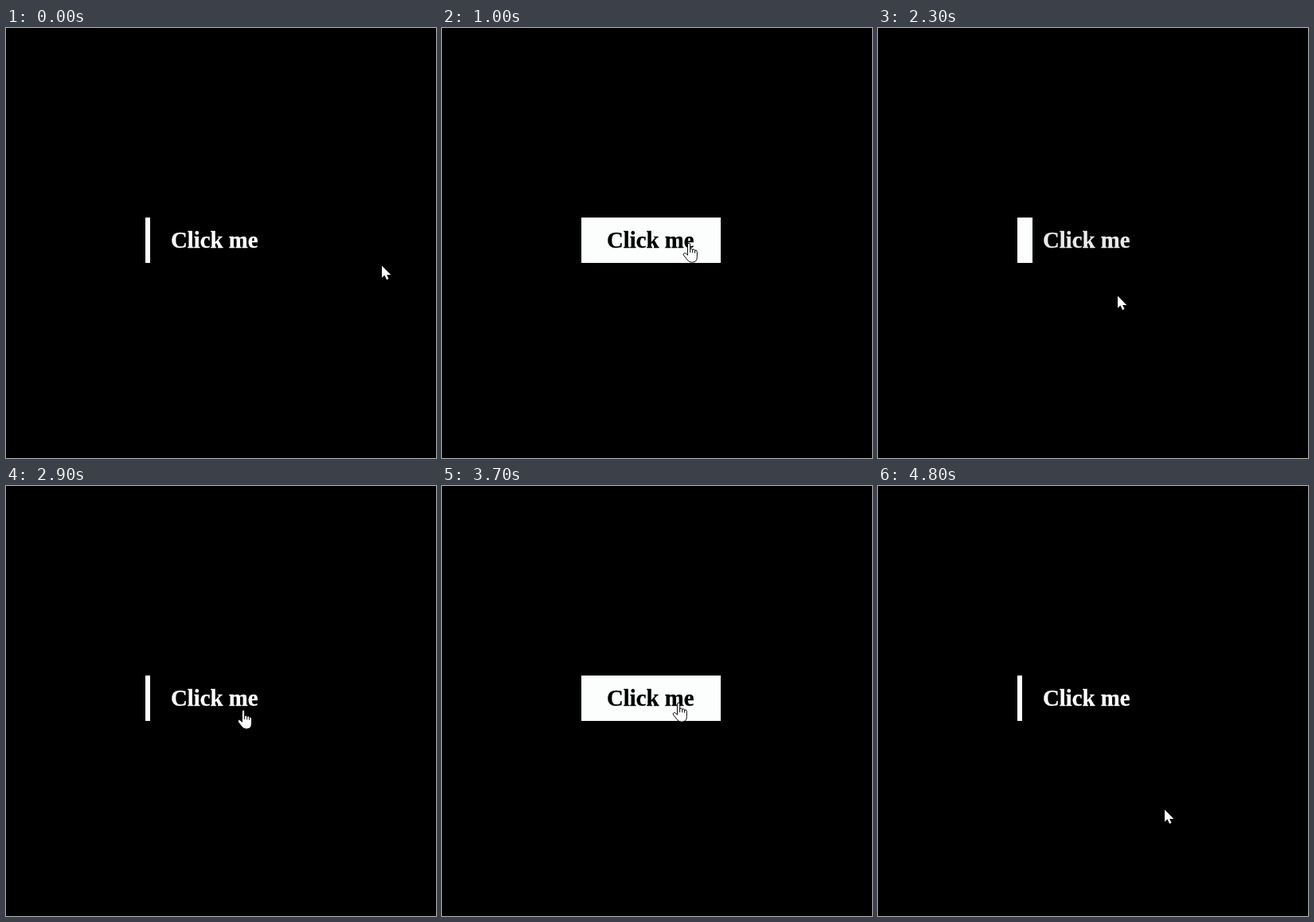
An HTML page that plays this animation: 540 px wide and 540 px high, repeating every 5 s.

```html
<!DOCTYPE html>
<html lang="en">
<head>
<meta charset="utf-8">
<title>Click me</title>
<style>
  html, body { margin: 0; width: 100%; height: 100%; overflow: hidden; background: #000; }
  svg { display: block; width: 540px; height: 540px; }
  text { font: bold 28.8px "Liberation Serif", "Times New Roman", serif; stroke-width: .3px; }
  #arrow, #hand { fill: #fff; stroke: #000; stroke-linejoin: round; stroke-linecap: round; }
</style>
</head>
<body>
<svg viewBox="0 0 540 540">
  <rect id="fill" x="175" y="238" width="6" height="57" fill="#fcfefd"/>
  <text id="label" x="207" y="276">Click me</text>
  <g id="cursor">
    <path id="arrow" paint-order="stroke"
      d="M0-.5V14.6L3.5 11.5L6 17L8.5 16L6.2 11H11.3Z"/>
    <g id="hand" transform="translate(-6.5 -1.2) scale(1.08)" stroke-width=".9">
      <path d="M5.5 14V2a1.5 1.5 0 0 1 3 0V7.2q1.4-1.3 2.8.6q1.5-.9 2.7.8q2.5-.6 2.5 2V16.5q0 6-5.5 6H10q-3 0-5-3L.8 14.2q-.6-1.6.7-2.2q1.4-.5 2.4.6Z"/>
      <path fill="none" d="M8.5 7V11M11.3 8V11.3M14 9V11.6"/>
    </g>
  </g>
</svg>
<script>
const LOOP = 5000, STEP = 100, FADE = 430;
const BOX = { left: 175, right: 350, top: 238, bottom: 295, bar: 6 };
const START = { x: 472, y: 299 };

// Each glide eases the pointer from wherever it rests to a new spot.
const glides = [
  { from: 200, to: 600, x: 325, y: 264 },
  { from: 600, to: 800, x: 309, y: 271 },
  { from: 1100, to: 1600, x: 296, y: 268 },
  { from: 1800, to: 2300, x: 301, y: 337 },
  { from: 2700, to: 2960, x: 296, y: 273 },
  { from: 3700, to: 3920, x: 360, y: 407 }
];
// Moments when the pointer enters, leaves, enters, leaves.
const crossings = [473, 2015, 2900, 3790];

const el = id => document.getElementById(id);
const mix = (a, b, k) => a + (b - a) * k;
const clamp = k => Math.min(1, Math.max(0, k));
const smooth = k => k * k * (3 - 2 * k);

// The CSS "ease" curve, cubic-bezier(.25, .1, .25, 1)
function ease(x) {
  let lo = 0, hi = 1, u;
  for (let i = 0; i < 30; i++) {
    u = (lo + hi) / 2;
    if (.75 * u * (1 - u) + u ** 3 < x) lo = u; else hi = u;
  }
  return .3 * u * (1 - u) ** 2 + 3 * u * u * (1 - u) + u ** 3;
}

const hoverAt = t => crossings.reduce(
  (h, start, i) => mix(h, 1 - i % 2, ease(clamp((t - start) / FADE))), 0);

const pointerAt = t => glides.reduce((p, g) => {
  const k = smooth(clamp((t - g.from) / (g.to - g.from)));
  return { x: mix(p.x, g.x, k), y: mix(p.y, g.y, k) };
}, START);

function draw(time) {
  const t = Math.floor(time % LOOP / STEP) * STEP;
  const h = hoverAt(t), { x, y } = pointerAt(t);
  const shade = Math.round(255 * (1 - h));
  const color = `rgb(${shade},${shade},${shade})`;
  const inside = x > BOX.left && x < BOX.right && y > BOX.top && y < BOX.bottom;

  el('fill').setAttribute('width', Math.round(mix(BOX.bar, BOX.right - BOX.left, h)));
  el('label').setAttribute('fill', color);
  el('label').setAttribute('stroke', color);
  el('cursor').setAttribute('transform', `translate(${Math.round(x)} ${Math.round(y)})`);
  el('hand').style.display = inside ? '' : 'none';
  el('arrow').style.display = inside ? 'none' : '';
}

const begin = performance.now();
function tick() {
  draw(performance.now() - begin);
  requestAnimationFrame(tick);
}
tick();
</script>
</body>
</html>
```
